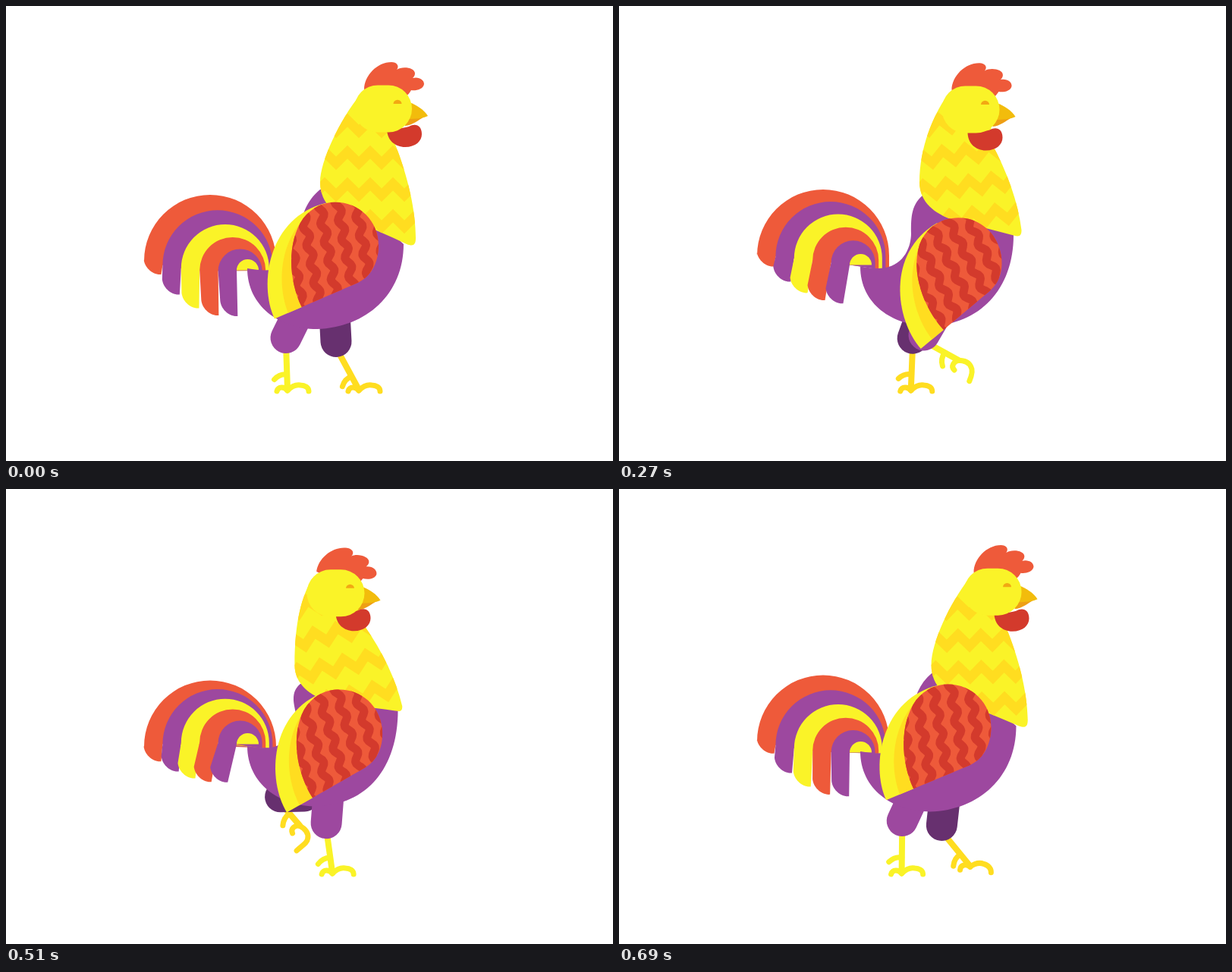
An HTML page with a canvas for the animation above (0.72 s loop, 800x600 px).

```html
<!DOCTYPE html>
<html lang="en">
<head>
<meta charset="utf-8">
<title>Walking rooster</title>
<style>
  html, body { margin: 0; width: 100%; height: 100%; overflow: hidden; background: #fff; }
  canvas { display: block; }
</style>
</head>
<body>
<canvas id="stage" width="800" height="600"></canvas>
<script>
const ctx = document.getElementById('stage').getContext('2d');
const { sin, cos, PI, max, min, abs, atan2 } = Math;
const LOOP = 720, STEP = 30, TAU = PI * 2;
const YELLOW = '#faf328', GOLD = '#ffdd20', ORANGE = '#ee5a3a', RED = '#d33a2c',
      PURPLE = '#9d489f', PLUM = '#67306f';

const rad = deg => deg * PI / 180;
const mix = (a, b, h) => a.map((v, i) => v + (b[i] - v) * h);

// Points: a start, then cubic segments of six numbers.
function curve(p) {
  const path = new Path2D();
  path.moveTo(p[0], p[1]);
  for (let i = 2; i < p.length; i += 6) path.bezierCurveTo(...p.slice(i, i + 6));
  return path;
}

function fill(color, points) {
  const path = curve(points);
  path.closePath();
  ctx.fillStyle = color;
  ctx.fill(path);
  return path;
}

function pen(color, width, join = 'round') {
  ctx.strokeStyle = color;
  ctx.lineWidth = width;
  ctx.lineCap = 'round';
  ctx.lineJoin = join;
}

function line(x1, y1, x2, y2) {
  ctx.beginPath();
  ctx.moveTo(x1, y1);
  ctx.lineTo(x2, y2);
  ctx.stroke();
}

function group(x, y, angle, draw) {
  ctx.save();
  ctx.translate(x, y);
  ctx.rotate(angle);
  draw();
  ctx.restore();
}

// The foot swings forward in the first half turn and is planted in the second.
function leg(turn, skin, thigh) {
  const a = turn % TAU, c = cos(a), s = sin(a), s2 = sin(2 * a);
  const swing = s > 0 ? 1 : 0, lift = max(0, s) ** 1.5;
  const hx = 409 - 24 * c - 10 * s;
  const kx = 402 - 33 * c - (swing ? 33 : 12) * s;
  const ky = 440 - 2.5 * c - swing * (30 * lift + 10 * s2);
  const ax = 418 - 47 * c - swing * (16 * s + 7 * s2), ay = 506 - 66 * lift;
  const tilt = -atan2(ax - kx, ay - ky - 8), arch = -6 - 6 * lift;

  pen(skin, 8);
  line(kx, ky + 8, ax, ay);
  pen(skin, 7);
  group(ax, ay, tilt, () => ctx.stroke(curve([0, -20, -6, -21, -12, -19, -17, -14])));
  group(ax, ay, tilt * min(1, 2.4 * lift),
    () => ctx.stroke(curve([0, 1, -4, -4, -12, -5, -14, 2])));
  group(ax, ay, rad(98 * lift), () => ctx.stroke(curve(
    [0, 1, 5, arch + 2, 11, arch - 1, 17, arch, 23, arch, 28, -3, 28 + 6 * lift, 2])));

  pen(thigh, 41);
  line(hx, 405, kx, ky);
}

// Nested feathers; each ring sways a little later than the one outside it.
function tail(b, rump) {
  const rings = [ORANGE, PURPLE, YELLOW, ORANGE, PURPLE, YELLOW].map((color, i) => {
    const sway = 9 * (1 - (i / 3.3 - 1) ** 2) * cos(b) + 7 * cos(0.3 * i) * sin(b);
    const left = 182 + 24.4 * i, right = 356 - 4.6 * i, r = (right - left) / 2;
    return {
      color, left, right, r,
      side: 249 + 15.7 * i + sway + r,
      tx: 204.5 + 23.3 * i + sway * i / 4.5,
      ty: 354 + 22.5 * i - 3 * i * i + 1.5 * sway
    };
  });
  rings.forEach(({ color, left, right, r, side, tx, ty }, i) => {
    const inner = rings[i + 1];
    ctx.fillStyle = color;
    ctx.beginPath();
    if (inner) ctx.moveTo(right, max(side, rump + 3));
    ctx.arc(left + r, side, r, 0, PI, true);
    if (inner) {
      ctx.lineTo(tx - 23, ty - 20);
      ctx.bezierCurveTo(tx - 22, ty - 10, tx - 12, ty + 1, tx, ty);
      ctx.lineTo(inner.left, inner.side);
    }
    ctx.fill();
  });
}

function body(h, rump) {
  const fx = 524 - 8 * h, fy = 314 - 24 * h, low = 426 - 8 * h;
  const nx = 414 - 28 * h, ny = 242 + 16 * h, back = 388 - 6 * h;
  fill(PURPLE, [
    318, rump, 318, rump + 49, 360, low, 410, low,
    475, low - 2, fx, 380 - 12 * h, fx, fy,
    500, 290, 460, 270, nx + 20, ny,
    nx + 10, ny, nx + 5, ny, nx, ny,
    nx - 16, ny + 13, back, ny + 33, back, 300,
    back, 318 - 4 * h, 380 - 6 * h, rump - 3, 350, rump + 2,
    340, rump + 3, 330, rump + 2, 318, rump
  ]);
}

const neckOut = [466, 118, 440, 150, 414, 205, 414, 232, 414, 262, 436, 276, 455, 283,
  480, 292, 505, 303, 528, 314, 536, 317, 540, 316, 540, 306,
  540, 270, 530, 225, 512, 180, 517, 165, 522, 150, 525, 140];
const neckIn = [399, 118, 387, 140, 378, 170, 378, 232, 378, 258, 400, 272, 418, 278,
  445, 284, 480, 287, 512, 291, 519, 292, 521, 291, 521, 285,
  512, 250, 495, 215, 468, 178, 464, 165, 460, 150, 455, 140];

function neck(h) {
  ctx.save();
  ctx.clip(fill(YELLOW, mix(neckOut, neckIn, h)));
  ctx.transform(1, -0.22 * h, 0.233 * h, 1, -92.4 * h, 95 * h);
  pen(GOLD, 12.5, 'miter');
  for (let y = 158; y < 320; y += 42) {
    ctx.beginPath();
    for (let i = -6; i < 10; i++) ctx.lineTo(450 + i * 15, y + (i % 2 ? 7.5 : -7.5));
    ctx.stroke();
  }
  ctx.restore();
}

function head(t, b, h) {
  const dx = -67 * h, dy = 2 * h;
  group(dx, dy, 0, () => {
    fill('#ee9f14', [526, 158, 526, 150, 528, 146, 530, 142, 538, 144, 544, 145, 551, 146,
      543, 151, 536, 157, 526, 158]);
    fill('#f2bc0c', [531, 127, 541, 130, 551, 137, 556, 145, 550, 148, 540, 149, 530, 149]);
    group(495, 106, rad(7 * h + 2 * sin(b)), () => fill(ORANGE, [
      -23, 4, -23, -14, -6, -32, 13, -32, 20, -32, 24, -27, 20, -22,
      27, -27, 44, -25, 44, -17, 44, -14, 42, -12, 41, -11,
      49, -13, 56, -9, 56, -3, 55, 4, 45, 6, 39, 5, 37, 8, 35, 12, 30, 14, 10, 14, -10, 10, -23, 4]));
  });
  // The wattle lags behind the head.
  group(-75 * h + 5 * sin(b), 3 * h - 3 * sin(b), 0, () => fill(RED, [
    502, 162, 502, 177, 513, 186, 526, 186, 540, 186, 548, 178, 548, 169,
    548, 158, 540, 154, 531, 159, 520, 162, 510, 162, 502, 162]));
  group(dx, dy, 0, () => {
    ctx.fillStyle = YELLOW;
    ctx.beginPath();
    ctx.roundRect(459, 104.5, 76, 62, 31);
    ctx.fill();
    const lid = max(0, 1 - abs(t - 335) / 40);
    ctx.fillStyle = '#f2a813';
    ctx.beginPath();
    ctx.ellipse(516, 129 - lid, 5.5, 5.2 - 3 * lid, 0, PI, TAU);
    ctx.fill();
  });
}

function wing(a, h) {
  const c = cos(a + rad(26));
  group(440.3 - 7 * c, 326.5 - 12 * c - 3 * h, rad(9 * c - 8.6), () => {
    fill(YELLOW, [-81, 96, -102, 50, -88, -38, -12, -56, 20, -20, 10, 30, -45, 81]);
    fill(GOLD, [-63, 88.5, -80, 45, -72, -25, -16, -54, 10, -20, 0, 30, -45, 81]);
    ctx.clip(fill(ORANGE, [-45, 81, -62, 45, -64, -5, -42, -36, -30, -51, -15, -57, 0, -57,
      32, -57, 57, -32, 57, 0, 57, 25, 45, 43, 28, 50]));
    ctx.rotate(rad(-10));
    pen(RED, 11);
    for (let x = -81; x < 80; x += 23.5) {
      ctx.beginPath();
      for (let y = -80; y <= 110; y += 3) ctx.lineTo(x + 3.5 * sin(y * TAU / 25), y);
      ctx.stroke();
    }
  });
}

// One loop is two steps: legs and wing turn once, head and tail twice.
function draw(t) {
  const a = t / LOOP * TAU, b = 2 * a, h = (1 - cos(b)) / 2;
  const rump = 346 - 7 * h - sin(b);
  ctx.fillStyle = '#fff';
  ctx.fillRect(0, 0, 800, 600);
  tail(b, rump);
  leg(a + PI, GOLD, PLUM);
  leg(a, YELLOW, PURPLE);
  body(h, rump);
  neck(h);
  head(t, b, h);
  wing(a, h);
}

const start = performance.now();
function tick() {
  const t = (performance.now() - start) % LOOP;
  draw(Math.floor(t / STEP) * STEP);
  requestAnimationFrame(tick);
}
tick();
</script>
</body>
</html>
```
